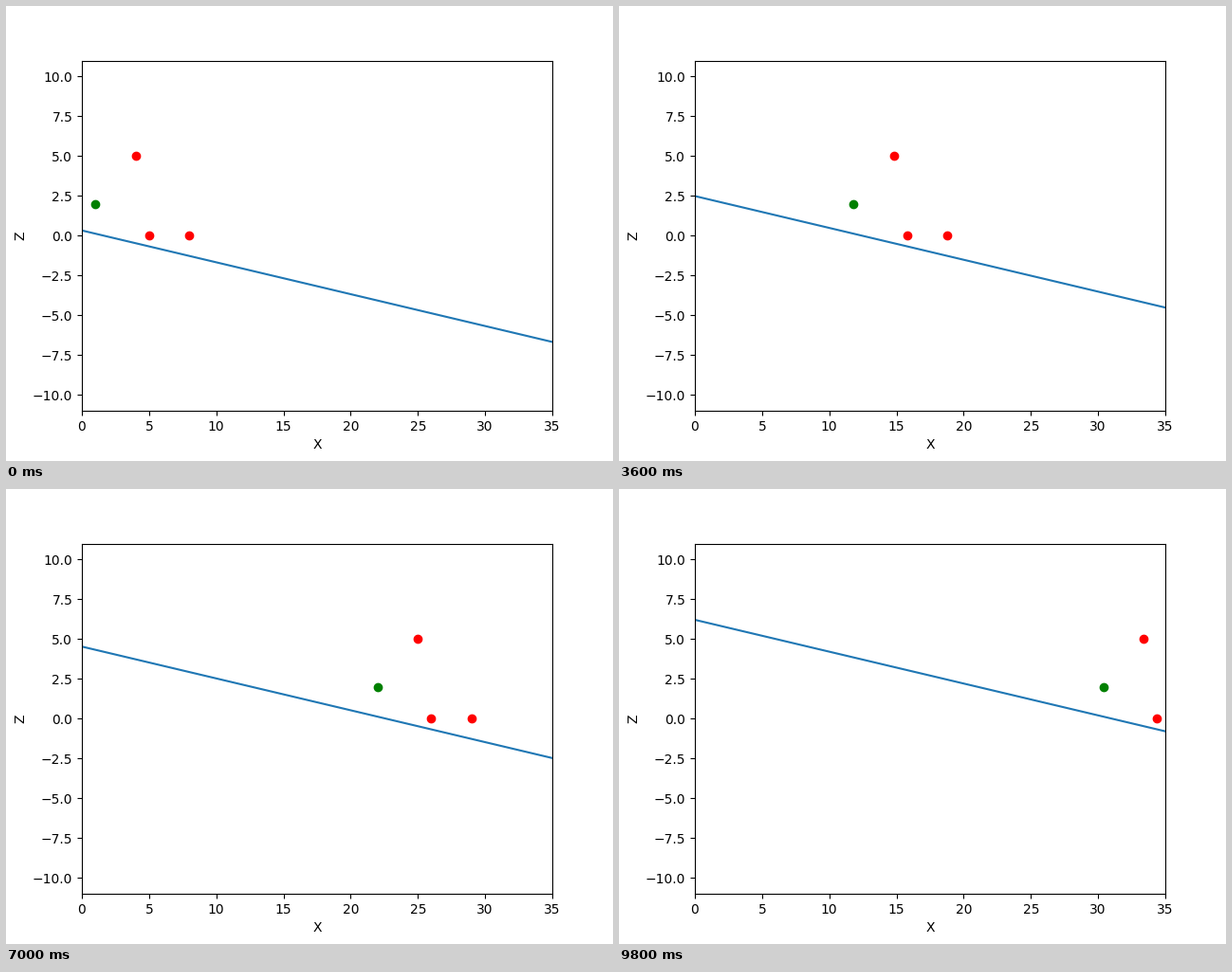
Recreate the animation shown at these times as a matplotlib script. Size 640 px wide and 480 px high, loop 9.9 s.

```python
import numpy as np
import matplotlib.pyplot as plt
from matplotlib.animation import FuncAnimation

FRAMES = 99
INTERVAL = 100  # ms
STEP = 0.3      # horizontal shift per frame
SLOPE, OFFSET = -0.2, 1 / 3

RED_X, RED_Z = np.array([4, 5, 8]), np.array([5, 0, 0])
GREEN_X, GREEN_Z = np.array([1]), np.array([2])

plt.rcParams["font.family"] = "DejaVu Sans"
fig, ax = plt.subplots(figsize=(6.4, 4.8), dpi=100)
ax.set(xlim=(0, 35), ylim=(-11, 11), xlabel="X", ylabel="Z")

line_x = np.array([0, 35])
line, = ax.plot([], [], color="tab:blue", lw=1.5)
reds, = ax.plot([], [], "o", color="red", ms=6)
green, = ax.plot([], [], "o", color="green", ms=6)


def update(frame):
    shift = STEP * frame
    line.set_data(line_x, OFFSET + SLOPE * (line_x - shift))
    reds.set_data(RED_X + shift, RED_Z)
    green.set_data(GREEN_X + shift, GREEN_Z)
    return line, reds, green


anim = FuncAnimation(fig, update, frames=FRAMES, interval=INTERVAL,
                     init_func=lambda: update(0), repeat=True, repeat_delay=0)
plt.show()
```
